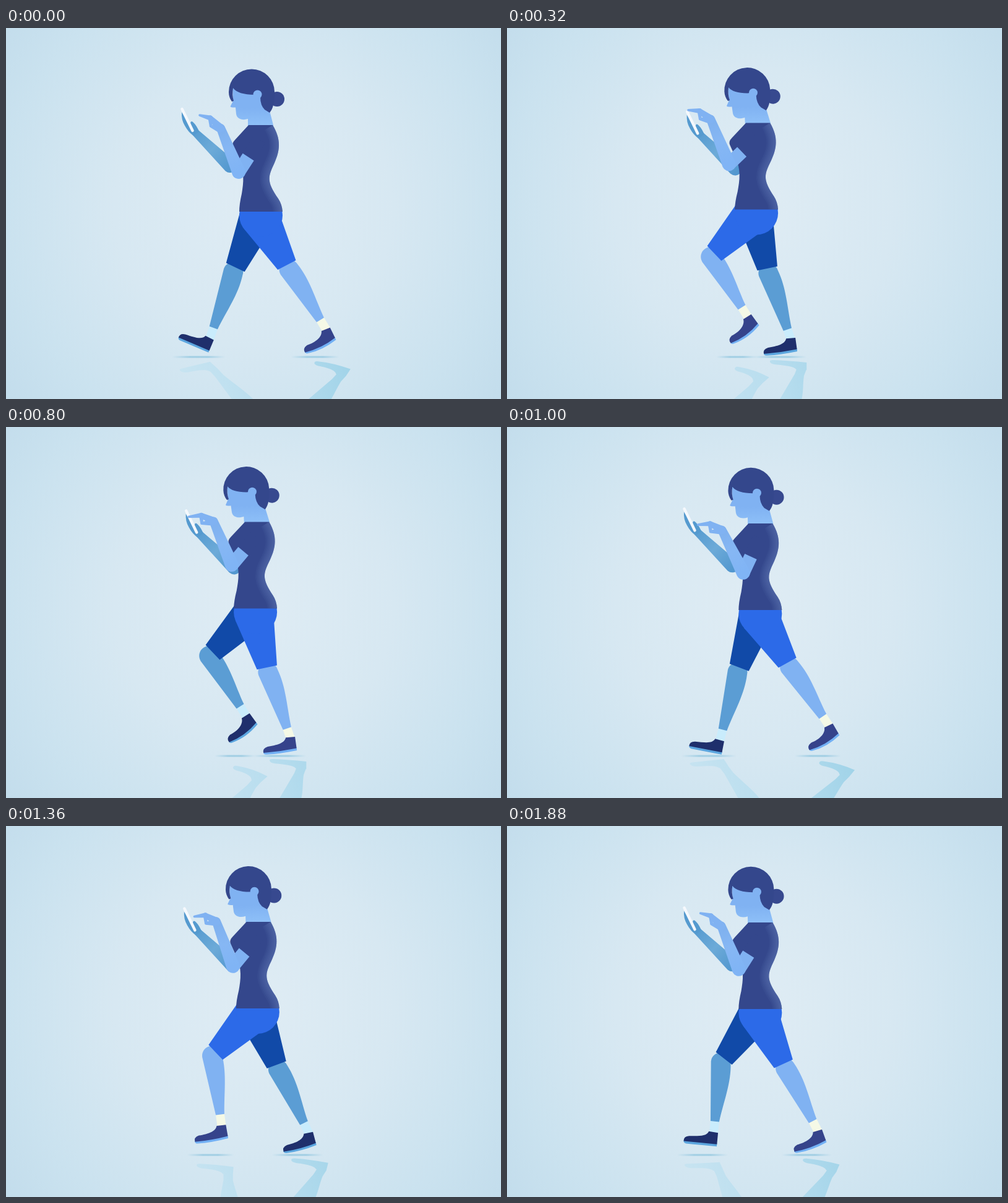
An HTML page with a canvas for the animation above (1920 ms loop, 800 by 600 pixels).

```html
<!DOCTYPE html>
<html lang="en">
<head>
<meta charset="utf-8">
<title>Walking with a phone</title>
<style>
html, body { margin: 0; width: 100%; height: 100%; overflow: hidden; }
canvas { display: block; }
</style>
</head>
<body>
<canvas id="stage" width="800" height="600"></canvas>
<script>
const g = document.getElementById('stage').getContext('2d');
const LOOP = 1920, STRIDE = 960, FRAME = 40, RAD = Math.PI / 180, GROUND = 530;

// time in the stride, then thigh, shin and foot angles (degrees, forward positive)
const GAIT = [
  [0, -27.5, -31.7, -26], [40, -29, -33.7, -30], [120, -1, -62, -52],
  [200, 26.3, -63.6, -63], [320, 46.3, -31.6, -36], [400, 46.3, -7.8, -10],
  [440, 38, 5.8, 5.5], [480, 25.6, 19.4, 23], [520, 20.8, 14.4, 11],
  [600, 8.7, 4.7, 0], [680, 0, -4, 0], [800, -11.8, -18.8, -8],
  [880, -20.2, -25.6, -15], [920, -24.4, -27.3, -20]
];
// time in the loop, then offsets of elbow, wrist and fingertip
const TAP = [
  [0, 0, 0, 0, 0, 0, 0], [320, -3, -2, -9, -3, -12, -2],
  [600, -5, -5, -9, -5, -17, 0], [1000, 10, 6, 3, 8, -2, 19],
  [1360, -1, 0, -2, -1, -4, 9], [1640, 1, 2, 1, -1, -3, -1],
  [1880, 3, 2, 2, 3, 2, 2]
];

const NEAR = { skin: '#80b2f2', shorts: '#2c6ae8', sock: '#f5f9e6', shoe: '#35438b', sole: '#72b0f4' };
const FAR = { skin: '#5b9dd4', shorts: '#114aa8', sock: '#c9ecfc', shoe: '#1f2f6c', sole: '#5ca6df' };
const SHIRT = '#34478c';

const linear = (x1, y1, x2, y2, ...stops) => {
  const l = g.createLinearGradient(x1, y1, x2, y2);
  stops.forEach((c, i) => l.addColorStop(i / (stops.length - 1), c));
  return l;
};
const sky = g.createRadialGradient(400, 290, 0, 400, 290, 500);
[[0, '#dfecf4'], [.45, '#d7e8f2'], [.8, '#cae2ef'], [1, '#c3ddec']].forEach(s => sky.addColorStop(...s));
const mirror = linear(300, 610, 560, 540, '#c5e3f1', '#b4dcee', '#98d0e7');
const neckTone = linear(0, 130, 0, 158, '#80b2f2', '#8ec0f8');
const farArmTone = linear(300, 165, 365, 228, '#559acf', '#6caad8', '#5297cf');

// periodic cubic through unevenly spaced keys
function sample(keys, period, t) {
  const n = keys.length;
  t %= period;
  const at = i => {
    const k = keys[(i + n) % n];
    return [k[0] + period * Math.floor(i / n), ...k.slice(1)];
  };
  let i = n - 1;
  while (keys[i][0] > t) i--;
  const [a, b, c, d] = [-1, 0, 1, 2].map(j => at(i + j));
  const h = c[0] - b[0], u = (t - b[0]) / h;
  return b.slice(1).map((p, j) => {
    j++;
    const m1 = (c[j] - a[j]) / (c[0] - a[0]) * h, m2 = (d[j] - b[j]) / (d[0] - b[0]) * h;
    const q = c[j];
    return p + u * (m1 + u * (3 * (q - p) - 2 * m1 - m2 + u * (2 * (p - q) + m1 + m2)));
  });
}

const fill = (path, color) => { g.fillStyle = color; g.fill(path); };

function disc(x, y, r, color) {
  const p = new Path2D();
  p.arc(x, y, r, 0, 2 * Math.PI);
  fill(p, color);
}

// rounded limb between two circles
function taper(x1, y1, r1, x2, y2, r2, color) {
  const a = Math.atan2(y2 - y1, x2 - x1);
  const o = Math.acos(Math.max(-1, Math.min(1, (r1 - r2) / Math.hypot(x2 - x1, y2 - y1))));
  const p = new Path2D();
  p.arc(x1, y1, r1, a + o, a - o + 2 * Math.PI);
  p.arc(x2, y2, r2, a - o, a + o);
  fill(p, color);
}

function line(x1, y1, x2, y2, width, color, cap = 'butt') {
  g.beginPath();
  g.moveTo(x1, y1);
  g.lineTo(x2, y2);
  g.lineWidth = width;
  g.strokeStyle = color;
  g.lineCap = cap;
  g.stroke();
}

const calf = new Path2D('M-16,0A16,16 0 0 1 16,0C20,32 11,62 7,96H-7Z');
const sock = new Path2D('M-7,95H7V116H-7Z');
const solePath = bend => new Path2D(`M7,17V22Q-20,${22 + bend} -43,22Q-48,21 -47,17Z`);
const shoePath = bend => new Path2D(`M-8,-1L7,0V18.500Q-20,${18.5 + bend} -47,18.500Q-48,11 -39,9.500C-24,${8 + bend * .6} -11,8 -8,-1Z`);

function thigh(j, r, color) {
  const sn = Math.sin(j.t), cs = Math.cos(j.t);
  const end = w => [j.hx - sn * j.reach + cs * w, j.hy + cs * j.reach + sn * w];
  const back = end(16.5), front = end(-16.5), inner = r - 6;
  const touch = (p, radius, side) =>
    Math.atan2(p[1] - j.hy, p[0] - j.hx) + side * Math.acos(radius / Math.hypot(p[0] - j.hx, p[1] - j.hy));
  const p = new Path2D();
  p.arc(j.hx, j.hy, inner, touch(front, inner, 1), touch(back, inner, -1) + 2 * Math.PI);
  p.lineTo(...back);
  p.lineTo(...front);
  const edge = touch(front, r, 1);
  p.lineTo(j.hx + r * Math.cos(edge), j.hy + r * Math.sin(edge));
  fill(p, color);
  disc(j.hx, j.hy, r, color);
}

function joints(hx, hy, phase) {
  const [t, s, f] = sample(GAIT, STRIDE, phase).map(v => v * RAD);
  const reach = 92 + 3 * Math.sin(t);
  const kx = hx - (reach + 8) * Math.sin(t), ky = hy + (reach + 8) * Math.cos(t);
  const ax = kx - 114 * Math.sin(s);
  let ay = ky + 114 * Math.cos(s);
  // the sole never sinks into the floor
  const low = ay + 22 * Math.cos(f) + Math.max(7 * Math.sin(f), -44 * Math.sin(f));
  ay -= Math.max(0, low - GROUND);
  const bend = Math.max(0, Math.min(7, -f / RAD * .22));
  return { hx, hy, t, s, f, reach, kx, ky, ax, ay, bend };
}

function leg(j, c, r) {
  g.save();
  g.translate(j.kx, j.ky);
  g.rotate(j.s);
  fill(sock, c.sock);
  fill(calf, c.skin);
  g.restore();
  g.save();
  g.translate(j.ax, j.ay);
  g.rotate(j.f);
  fill(solePath(j.bend), c.sole);
  fill(shoePath(j.bend), c.shoe);
  g.restore();
  thigh(j, r, c.shorts);
}

function shadow(j) {
  const half = 46 - Math.max(0, 512 - j.ay) * .3, x = j.ax - 18;
  const dark = 'rgba(140,196,222,.7)', clear = 'rgba(140,196,222,0)';
  g.fillStyle = linear(x - half, 0, x + half, 0, clear, dark, dark, clear);
  g.fillRect(x - half, 530.5, half * 2, 3);
}

function reflection(legs) {
  const floor = new DOMMatrix([1.085, 0, -.15, -.57, 53.7, 839]);
  const shape = new Path2D();
  for (const j of legs) {
    const knee = floor.translate(j.kx, j.ky).rotate(j.s / RAD);
    const ankle = floor.translate(j.ax, j.ay).rotate(j.f / RAD);
    shape.addPath(calf, knee);
    shape.addPath(sock, knee);
    shape.addPath(solePath(j.bend), ankle);
    shape.addPath(shoePath(j.bend), ankle);
  }
  g.globalAlpha = .85;
  fill(shape, mirror);
  g.globalAlpha = 1;
}

const face = new Path2D('M366,94L367,118L362.500,127Q364,129 371,128.500L372,139C373,147 382,150 391,147V165H432V157L426,134L420,92Z');
const hair = new Path2D('M365,119Q360,112 360,103.500A37,37 0 0 1 434,103.500C434,120 432,130 426,137L418,132Q411,125 411,112L402,108C384,108 372,104 367,97Q365,108 368,118Z');
const back = 'C420,247 424,240 434,218C443,198 445,180 431,157';
const torso = new Path2D(`M392,157L370,181Q364,187 367,193L376,212C386,232 384,250 381,268Q377,285 377,297H447Q446,285 440,276${back}Z`);
const backEdge = new Path2D(`M447,297Q446,285 440,276${back}`);
const palm = new Path2D('M284,136Q283,148 289,158Q295,169 303,174L312,167Q308,158 304,154Q299,148 298,154L300,160Z');

function farArm(s) {
  g.save();
  g.translate(7.5 * s, 5 * s);
  taper(362, 223, 11, 305, 168, 6, farArmTone);
  fill(palm, '#559acf');
  line(284.5, 131, 301.5, 166, 4.5, '#f5f8fc', 'round');
  g.restore();
}

function head(s) {
  g.save();
  g.translate(411 - 7 * s, 157 - 3.5 * s);
  g.rotate(-3 * RAD * s);
  g.translate(-411, -157);
  disc(438, 115, 12, '#37498f');
  fill(face, neckTone);
  fill(hair, SHIRT);
  disc(406.5, 107.5, 7, NEAR.skin);
  g.restore();
}

function body(s) {
  const lean = .025 * s;
  g.save();
  g.transform(1, 0, -lean, 1, 297 * lean - 10 * s, -4 * s);
  fill(torso, SHIRT);
  g.clip(torso);
  // soft light along the back
  g.strokeStyle = 'rgba(120,135,195,.07)';
  for (let w = 5; w <= 30; w += 5) {
    g.lineWidth = w;
    g.stroke(backEdge);
  }
  g.restore();
}

function nearArm(s, t) {
  const o = sample(TAP, LOOP, t);
  const ex = 376 - 16 * s + o[0], ey = 233 - 12 * s + o[1];
  const wx = 347 - 10 * s + o[2], wy = 162 - 13 * s + o[3];
  const tx = 313 - 9 * s + o[4], ty = 141 - 7 * s + o[5];
  const sx = 410 - 7 * s, sy = 180 - 3.5 * s, d = Math.hypot(sx - ex, sy - ey);
  const cx = ex + (sx - ex) / d * 29, cy = ey + (sy - ey) / d * 29;
  const mx = wx + (tx - wx) * .5, my = wy + (ty - wy) * .5 - 6;
  line(sx, sy, cx, cy, 22, SHIRT);
  line(ex, ey, cx, cy, 21.5, NEAR.skin);
  taper(ex, ey, 11, wx, wy, 7, linear(ex, ey, wx, wy, '#80b4f5', '#86b7f4', '#7eb0ee'));
  taper(wx, wy, 6.5, mx, my, 4, NEAR.skin);
  taper(mx, my, 4, tx, ty, 1.8, NEAR.skin);
  // folded finger and thumb
  taper(mx, my, 3.5, mx + 1, my + 12, 2.3, NEAR.skin);
  taper(mx + 1, my + 13, 2.3, wx - 2, wy + 2, 5, NEAR.skin);
}

function draw(t) {
  g.fillStyle = sky;
  g.fillRect(0, 0, 800, 600);

  // sway: 0 with the legs apart, about 1 as they pass
  const s = 1.03 * Math.abs(Math.sin(2 * Math.PI * t / STRIDE));
  const hx = 412 - 10 * s, hy = 303 - 4 * s;
  const near = joints(hx, hy, t), far = joints(hx - 1, hy, t + STRIDE / 2);

  reflection([far, near]);
  shadow(far);
  shadow(near);
  leg(far, FAR, 33);
  farArm(s);
  leg(near, NEAR, 35);
  head(s);
  body(s);
  nearArm(s, t);
}

function tick() {
  draw(Math.floor(performance.now() % LOOP / FRAME) * FRAME);
  requestAnimationFrame(tick);
}
tick();
</script>
</body>
</html>
```
